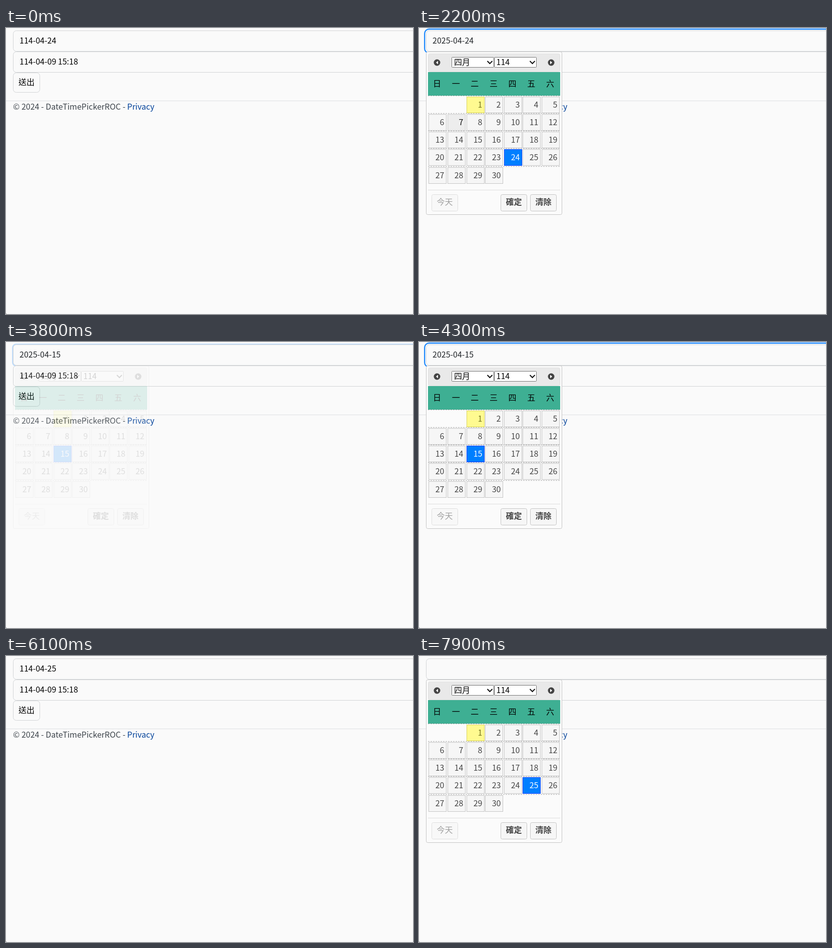
An HTML page for the animation above (8000 ms loop, 813 px wide and 571 px high).

```html
<!DOCTYPE html>
<html lang="zh-Hant">
<head>
<meta charset="utf-8">
<title>DateTimePickerROC</title>
<style>
html, body { margin: 0; width: 100%; height: 100%; overflow: hidden; background: #fafafa; }
svg { display: block; width: 813px; height: 571px; }
text { font: 16px "Noto Sans CJK TC", "Noto Sans CJK JP", "Noto Sans CJK", sans-serif; white-space: pre; }
.field { fill: #fafafa; stroke: #d3d5d7; }
.state rect { fill: #f6f6f6; stroke: #c5c5c5; }
.state text { fill: #454545; }
.state.mark rect { fill: #fffa90; stroke: #dad55e; }
.state.mark text { fill: #777620; }
.state.hover rect { fill: #ededed; stroke: #ccc; }
.state.hover text { fill: #111; }
.state.on rect { fill: #007fff; stroke: #003eff; }
.state.on text { fill: #fff; font-weight: 500; }
.state.off { opacity: .5; }
.bold text { font-weight: 700; }
.day text { text-anchor: end; }
.mid { text-anchor: middle; }
</style>
</head>
<body>
<svg id="stage" viewBox="0 0 813 571"></svg>
<script>
const LOOP = 8000, STEP = 100;
const $ = id => document.getElementById(id);

const rect = (x, y, w, h, rx, attrs = '') =>
  `<rect x="${x}" y="${y}" width="${w}" height="${h}" rx="${rx}" ${attrs}/>`;
const text = (x, y, s, attrs = '') => `<text x="${x}" y="${y}" ${attrs}>${s}</text>`;
const line = (x1, x2, y, color, attrs = '') =>
  `<path d="M${x1} ${y}H${x2}" stroke="${color}" ${attrs}/>`;

function day(n) {
  const slot = n + 1;  // the month starts on a Tuesday
  const x = Math.round(19.22 + 37.65 * (slot % 7));
  const y = Math.round(136.6 + 35.25 * Math.floor(slot / 7));
  return `<g id="d${n}" class="state day">${rect(x + .5, y + .5, 35, 32, 0)}${text(x + 31.5, y + 22, n)}</g>`;
}

const button = (id, x, label, cls) =>
  `<g id="${id}" class="state ${cls}">${rect(x + .5, 332.5, 52, 33, 3)}${text(x + 26.5, 353, label, 'class="mid"')}</g>`;

const select = (x, label, dx) =>
  rect(x + .5, 58.5, 84, 20, 1, 'fill="#fff" stroke="#767676"') + text(x + dx, 74, label) +
  `<path d="M${x + 71.5} 66l5 5 5-5" fill="none" stroke="#111" stroke-width="2"/>`;

const arrow = (x, dir) =>
  `<circle cx="${x}" cy="69" r="6.5" fill="#444"/><path d="M${x - 2 * dir} 65.5l${4 * dir} 3.5 ${-4 * dir} 3.5z" fill="#fff"/>`;

const days = Array.from({ length: 30 }, (_, i) => i + 1);
const weekdays = [...'日一二三四五六'].map((s, i) => text(36 + 37.65 * i, 117, s, 'class="mid"')).join('');
const dashes = [0, 1, 2, 3, 4].map(r =>
  line(18, 282, Math.round(136.6 + 35.25 * r) - 1.5, '#b0b0b0', 'stroke-dasharray="3 2"')).join('');

$('stage').innerHTML = `
  ${rect(0, 0, 813, 571, 0, 'fill="#fafafa"')}
  ${rect(0, 570, 1, 1, 0, 'fill="#888"')}
  <rect id="ring" fill="#258cfb"/><rect id="gap" fill="#fff"/>
  ${rect(14.5, 5.5, 820, 41, 6, 'class="field"')}
  ${text(27, 31, '', 'id="value"')}
  ${rect(14.5, 47.5, 820, 41, 6, 'class="field"')}
  ${text(27, 73, '114-04-09 15:18')}
  ${rect(14.5, 89.5, 53, 39, 6, 'class="field"')}
  ${text(25, 114, '送出')}
  ${line(0, 813, 145.5, '#dee0e2')}
  ${text(14, 163, '© 2024 - DateTimePickerROC - ', 'fill="#3d444b"')}
  ${text(242, 163, 'Privacy', 'fill="#004099"')}
  <g id="popup">
    ${rect(14.5, 47.5, 271, 325, 3, 'fill="#fbfbfb" stroke="#c5c5c5"')}
    ${rect(18.5, 51.5, 263, 36, 3, 'fill="#e9e9e9" stroke="#e0e0e0"')}
    ${arrow(36, -1)}${arrow(264, 1)}
    ${select(65, '四月', 5)}${select(150, '114', 4.5)}
    ${rect(18, 88, 264, 47, 0, 'fill="#3eaf93"')}
    ${weekdays}${dashes}${days.map(day).join('')}
    ${line(18, 282, 323.5, '#ddd')}
    ${button('today', 25, '今天', 'off')}
    ${button('ok', 163, '確定', 'bold')}
    ${button('clear', 222, '清除', 'bold')}
  </g>`;

// Last entry of a [time, value] list that has started.
const at = (list, t) => list.reduce((v, [start, next]) => t >= start ? next : v, undefined);

const values = [[0, '114-04-24'], [1500, '2025-04-24'], [2900, '114-04-15'],
  [3800, '2025-04-15'], [5900, '114-04-25'], [6400, '2025-04-25'], [7000, '']];
const selected = [[0, 24], [3800, 15], [6400, 25]];
const hovered = [[0, 0], [1700, 6], [2100, 7], [2600, 15], [3800, 0], [4400, 24],
  [5000, 25], [6400, 0], [7000, 'clear'], [7600, 0], [7700, 30], [7800, 28], [7900, 0]];

// Levels of the first, second and later steps of a fade.
const fade = (start, levels) => levels.map((v, i) => [start + i * STEP, v]);
const popIn = [.15, .65, 1], popOut = [.95, .45, 0];
const ringIn = [.4, .9, 1], ringOut = [.6, .1, 0];
const cycle = (up, down) => [[0, 0], ...fade(1500, up), ...fade(2900, down),
  ...fade(3800, up), ...fade(5900, down), ...fade(6400, up)];
const popup = cycle(popIn, popOut);
const ring = [...cycle(ringIn, ringOut), ...fade(7000, ringOut)];

function setRing(id, spread, k) {
  const s = spread * k, el = $(id);
  const box = { x: 14 - s, y: 5 - s, width: 830, height: 42 + 2 * s, rx: 6 + s, opacity: k };
  for (const key in box) el.setAttribute(key, box[key]);
}

function draw(ms) {
  const t = Math.floor(ms % LOOP / STEP) * STEP;
  const value = at(values, t), on = at(selected, t), hover = at(hovered, t), k = at(ring, t);
  $('value').textContent = value;
  $('value').setAttribute('fill', value.startsWith('2025') ? '#212529' : '#000');
  setRing('ring', 4, k);
  setRing('gap', 1.6, k);
  $('popup').setAttribute('opacity', at(popup, t));
  for (const n of days) {
    const state = n === on ? 'on' : n === hover ? 'hover' : n === 1 ? 'mark' : '';
    $('d' + n).setAttribute('class', 'state day ' + state);
  }
  $('clear').setAttribute('class', 'state bold ' + (hover === 'clear' ? 'hover' : ''));
}

const start = performance.now();
function tick() {
  draw(performance.now() - start);
  requestAnimationFrame(tick);
}
tick();
</script>
</body>
</html>
```
